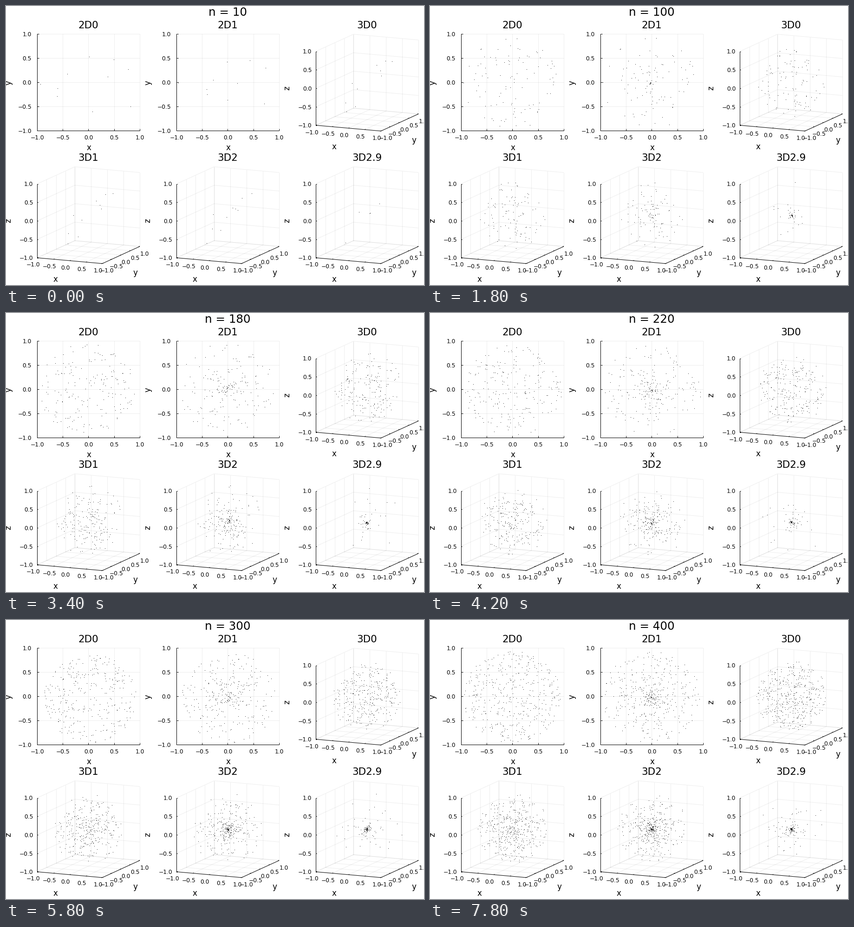
Animation of 900x600 px, one loop 8 s. Source, as a matplotlib script:

```python
import numpy as np
import matplotlib.pyplot as plt
from matplotlib.animation import FuncAnimation

W, H, DPI = 900, 600, 100
FRAMES, STEP_MS, BATCH = 40, 200, 10
TITLE, SUBTITLE, GUIDE, TICK = 24.5, 21.4, 16.8, 12.25  # font sizes in px
TICKS = np.linspace(-1, 1, 5)
REACH = 0.96  # radius of the farthest point

# Panel layout: name, left, top, dimension, exponent
PANELS = [
    ("2D0", 0, 0, 2, 0), ("2D1", 300, 0, 2, 1), ("3D0", 600, 0, 3, 0),
    ("3D1", 0, 285, 3, 1), ("3D2", 300, 285, 3, 2), ("3D2.9", 600, 285, 3, 2.9),
]

# Projections: centre and one pixel vector per data axis, y pointing down
CENTER = {2: np.array([177.4, 164.0]), 3: np.array([177.7, 164.8])}
BASIS = {
    2: np.array([[110.5, 0], [0, -104]]),
    3: np.array([[70, 6.2], [40.4, -18.4], [0, -79.5]]),
}

plt.rcParams["font.family"] = "DejaVu Sans"
fig = plt.figure(figsize=(W / DPI, H / DPI), dpi=DPI, facecolor="white")
ax = fig.add_axes([0, 0, 1, 1])
ax.set(xlim=(0, W), ylim=(H, 0))
ax.axis("off")


def label(x, y, s, px, ha="center", rot=0):
    return ax.text(x, y, s, fontsize=px * 72 / DPI, ha=ha, va="baseline",
                   rotation=rot, rotation_mode="anchor", color="black")


def line(p, q, grid=False):
    ax.plot([p[0], q[0]], [p[1], q[1]], color="black", lw=72 / DPI,
            alpha=0.07 if grid else 1, solid_capstyle="butt",
            zorder=1 if grid else 2)


def tick_text(v):
    return f"{v:.1f}".replace("-", "\u2212")


def project(pts, dim, corner):
    return np.asarray(pts) @ BASIS[dim] + CENTER[dim] + corner


def draw_2d(corner):
    left, top = corner

    def at(*p):
        return project(p, 2, corner)

    for v in TICKS:
        line(at(v, -1), at(v, 1), grid=True)
        line(at(-1, v), at(1, v), grid=True)
        bottom, side = at(v, -1), at(-1, v)
        line(bottom, bottom + (0, -4))
        line(side, side + (4, 0))
        label(bottom[0] + 0.4, top + 287, tick_text(v), TICK)
        label(left + 55, side[1] + 5.2, tick_text(v), TICK, "right")
    line(at(-1, -1), at(1, -1))
    line(at(-1, -1), at(-1, 1))
    label(left + 178, top + 310, "x", GUIDE)
    label(left + 10, top + 165, "y", GUIDE, rot=90)


def draw_3d(corner):
    left, top = corner

    def at(*p):
        return project(p, 3, corner)

    for v in TICKS:
        for p, q in [
            ((v, -1, -1), (v, 1, -1)), ((v, 1, -1), (v, 1, 1)),
            ((-1, v, -1), (1, v, -1)), ((-1, v, -1), (-1, v, 1)),
            ((-1, -1, v), (-1, 1, v)), ((-1, 1, v), (1, 1, v)),
        ]:
            line(at(*p), at(*q), grid=True)
        tx, ty, tz = at(v, -1, -1), at(1, v, -1), at(-1, -1, v)
        line(tx, tx + (2, -0.9))
        line(ty, ty + (-2.2, -0.2))
        line(tz, tz + (2, 0))
        label(tx[0] - 9, tx[1] + 19, tick_text(v), TICK)
        label(ty[0] + 10, ty[1] + 19.5, tick_text(v), TICK)
        label(left + 58.5, tz[1] + 4.8, tick_text(v), TICK, "right")
    line(at(-1, -1, -1), at(-1, -1, 1))
    line(at(-1, -1, -1), at(1, -1, -1))
    line(at(1, -1, -1), at(1, 1, -1))
    label(left + 106, top + 307.8, "x", GUIDE)
    label(left + 278, top + 294, "y", GUIDE)
    label(left + 10, top + 177, "z", GUIDE, rot=90)


def sample(rng, n, dim):
    """Random directions and a uniform mass fraction for every point."""
    d = rng.normal(size=(n, dim))
    return d / np.linalg.norm(d, axis=1, keepdims=True), rng.random((n, 1))


def cloud(directions, u, dim, power):
    """Ball with density r**-power, centred on its mean and scaled to REACH."""
    p = directions * u ** (1 / (dim - power))
    p -= p.mean(axis=0)
    return REACH * p / np.linalg.norm(p, axis=1).max()


for name, left, top, dim, _ in PANELS:
    (draw_2d if dim == 2 else draw_3d)((left, top))
    label(left + 177.5, top + 48, name, SUBTITLE)

title = label(477.2, 21, "", TITLE)
dots, = ax.plot([], [], ",", color="black", zorder=3)


def update(k):
    n = BATCH * (k + 1)
    rng = np.random.default_rng(100 + k)
    base = {dim: sample(rng, n, dim) for dim in (2, 3)}
    parts = [project(cloud(*base[dim], dim, power), dim, (left, top))
             for _, left, top, dim, power in PANELS]
    x, y = np.vstack(parts).T
    dots.set_data(x, y + 1)
    title.set_text(f"n = {n}")
    return dots, title


anim = FuncAnimation(fig, update, frames=FRAMES, interval=STEP_MS,
                     repeat=True, repeat_delay=0, blit=False)
plt.show()
```
